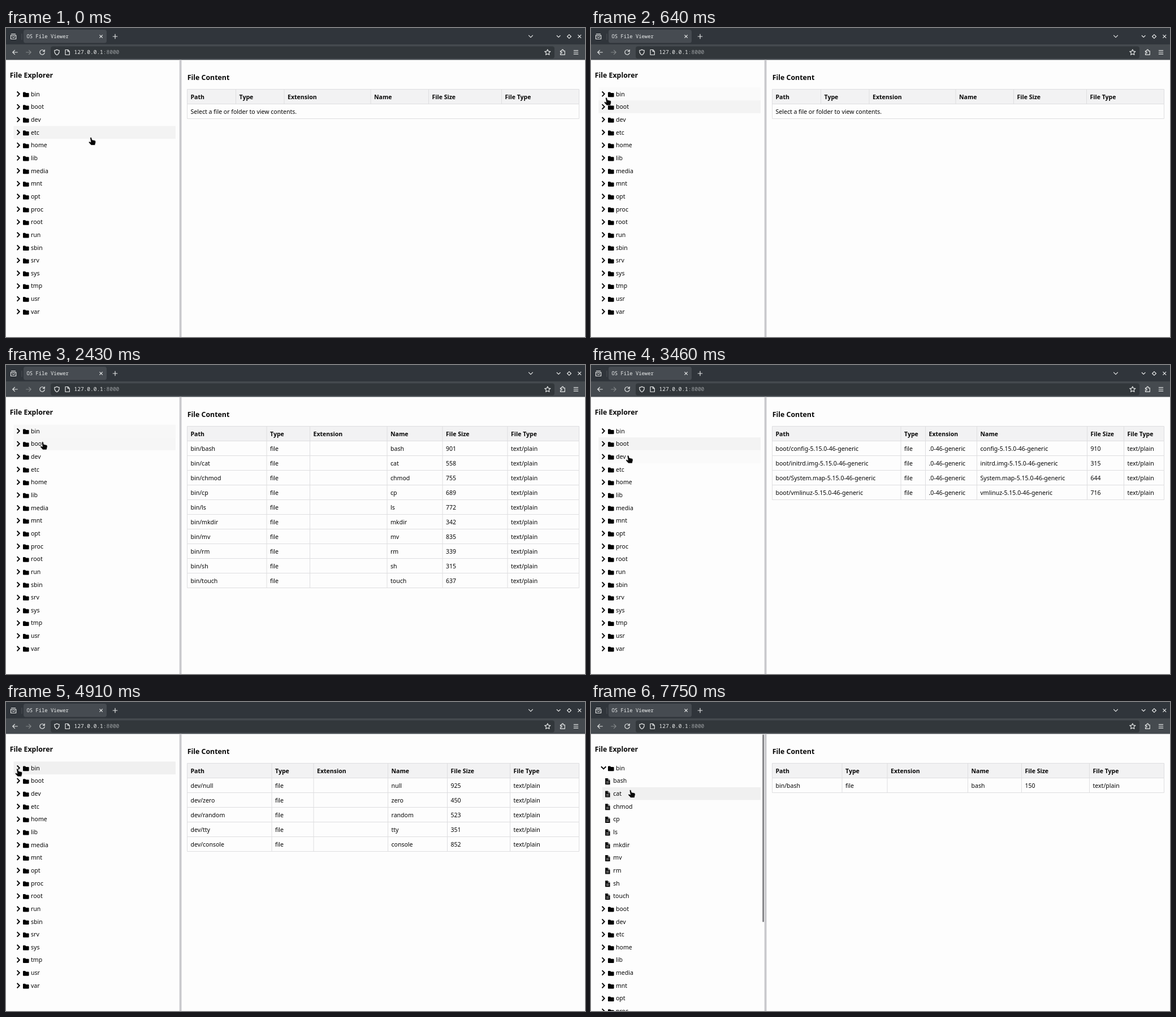
Write an HTML page that moves like this. It is 1024x547 px and loops after 7990 ms.

```html
<!DOCTYPE html>
<html lang="en">
<head>
<meta charset="utf-8">
<title>OS File Viewer</title>
<style>
  html, body { margin: 0; width: 100%; height: 100%; overflow: hidden; background: #fdfdfd; }
  svg { display: block; width: 1024px; height: 547px; }
  text { font: 10.54px "Noto Sans", sans-serif; fill: #060606; white-space: pre; }
  .b { font-weight: 700; }
  .h { font-weight: 700; font-size: 12.33px; }
  .m { font-family: "Noto Sans Mono", monospace; fill: #eceeee; }
  .line { fill: none; stroke: #e4e6e6; stroke-width: 1.2; stroke-linecap: round; stroke-linejoin: round; }
  .chev { fill: none; stroke: #060606; stroke-width: 1.9; }
  .rule { fill: none; stroke: #dedee0; }
</style>
</head>
<body>
<svg viewBox="0 0 1024 547">
  <rect width="1024" height="30" fill="#30353b"/>
  <rect y="29" width="1024" height="27.5" fill="#454a4f"/>
  <rect x="31" y="3" width="147" height="23.5" rx="4" fill="#464b51"/>
  <path d="M28 10V21" stroke="#4c5156"/>
  <rect x="79" y="32.5" width="891" height="21.5" rx="4" fill="#32373b"/>
  <text class="m" x="36.5" y="18.2" style="font-size:8.85px">OS File Viewer</text>
  <text class="m" x="120.5" y="46.3" style="font-size:9.5px">127.0.0.1<tspan fill="#9b9fa2">:8000</tspan></text>
  <g class="line">
    <path d="M9.5 10.5H16.5M8.5 12.8H17.7V19.5H8.5ZM11 15.5Q13 18 15.2 15.5"/>
    <path d="M165.8 12.6l4.6 4.6m0-4.6l-4.6 4.6M189.2 15H196.8M193 11.2V18.8"/>
    <path d="M924.5 13.2l3.5 3.5 3.5-3.5M974.3 13.5l2.9 2.9 2.9-2.9M996 11.6l3.4 3.4-3.4 3.4-3.4-3.4ZM1011.8 12.4l5 5m0-5l-5 5"/>
    <path d="M20.3 43H12M15.5 39.3L11.8 43l3.7 3.7"/>
    <path d="M35.7 43H44M40.5 39.3L44.2 43l-3.7 3.7" stroke="#83878a"/>
    <path d="M67.6 40.7A4.2 4.2 0 1 0 68.2 43.6M68.3 38.6V41.4H65.4"/>
    <path d="M90 38.2Q92 39.6 94.2 39.7Q94.5 45.6 90 47.8Q85.5 45.6 85.8 39.7Q88 39.6 90 38.2Z"/>
    <path d="M105 38.5H109.5L112.3 41.3V47.5H105ZM109.3 38.7V41.5H112"/>
    <path d="M957.8 38l1.5 3.2 3.5.4-2.6 2.4.7 3.5-3.1-1.7-3.1 1.7.7-3.5-2.6-2.4 3.5-.4Z"/>
    <path d="M980.5 40.7H983V39.5a1.4 1.4 0 0 1 2.8 0V40.7H988.3V47.3H980.5V45H982a1.2 1.2 0 0 0 0-2.4H980.5Z"/>
    <path d="M1004.3 39.8H1011.7M1004.3 43H1011.7M1004.3 46.2H1011.7"/>
  </g>
  <rect x="306.7" y="56.5" width="3.8" height="491" fill="#c9c9cd"/>
  <text class="h" x="6.8" y="88.4">File Explorer</text>
  <text class="h" x="320.8" y="91.7">File Content</text>
  <g id="hover"></g>
  <g id="trees"></g>
  <g id="tables"></g>
  <path id="hand" fill="#060606" stroke="#fdfdfd" stroke-width=".7"
    d="M-1.9 1Q-.6 -1 .9 .8L1.9 4.4L6.8 5.5Q8.7 6.3 8.2 9L6.9 14H.2L-4.2 9.2Q-4.6 7.2 -2.5 7.6L-.6 8.6Z"/>
</svg>
<script>
const LOOP = 7990, TOP = 105.5, ROW = 22.66, FADE = 200, OPEN_AT = 6110;
const $ = id => document.getElementById(id);
const dirs = 'bin boot dev etc home lib media mnt opt proc root run sbin srv sys tmp usr var'.split(' ');
const files = 'bash cat chmod cp ls mkdir mv rm sh touch'.split(' ');

const text = (x, y, s, cls = '') => `<text x="${x}" y="${y}" class="${cls}">${s}</text>`;

function dirRow(name, i, open) {
  const y = TOP + i * ROW;
  const arrow = open ? 'M17.9 8.8l4.3 4.2 4.3-4.2' : 'M19.6 7l4.2 4.3-4.2 4.3';
  return `<g transform="translate(0 ${y})"><path class="chev" d="${arrow}"/>
    <path d="M30 9Q30 8 31 8H34L35.3 9.4H39.6Q40.6 9.4 40.6 10.4V15.7Q40.6 16.7 39.6 16.7H31Q30 16.7 30 15.7Z"/>
    ${text(44, 15.1, name)}</g>`;
}

function fileRow(name, i) {
  return `<g transform="translate(0 ${TOP + i * ROW})">
    <path d="M25.2 6.8H30L33.6 10.3V17.8H25.2Z"/>
    <path d="M30.3 6.8V10H33.4M27 12.8H31.8M27 15.2H31.8" fill="none" stroke="#fdfdfd" stroke-width=".8"/>
    ${text(39.3, 15.1, name)}</g>`;
}

const closedTree = dirs.map((d, i) => dirRow(d, i)).join('');
const openTree = dirRow('bin', 0, true) + files.map((f, i) => fileRow(f, i + 1)).join('')
  + dirs.slice(1).map((d, i) => dirRow(d, i + 11)).join('')
  + '<rect x="303.3" y="57.5" width="2.6" height="332" rx="1.3" fill="#77777a"/>';
$('trees').innerHTML = `<g>${closedTree}</g><g>${openTree}</g>`;

// Each view: start time, column separators, folder, "name size" entries, extension
const views = [
  [0, [406.5, 492, 645, 747.5, 876.5]],
  [2010, [461, 537.5, 674, 772, 887], 'bin',
    'bash 901,cat 558,chmod 755,cp 689,ls 772,mkdir 342,mv 835,rm 339,sh 315,touch 637'],
  [3020, [548, 591.5, 682.5, 877.5, 942.5], 'boot',
    'config-5.15.0-46-generic 910,initrd.img-5.15.0-46-generic 315,System.map-5.15.0-46-generic 644,vmlinuz-5.15.0-46-generic 716',
    '.0-46-generic'],
  [4050, [470, 544, 675.5, 780.5, 891.5], 'dev', 'null 925,zero 450,random 523,tty 351,console 852'],
  [7200, [444, 524, 666.5, 761.5, 881.5], 'bin', 'bash 150']
];
const heads = ['Path', 'Type', 'Extension', 'Name', 'File Size', 'File Type'];

function table([, seps, dir, list, ext = '']) {
  const xs = [320.5, ...seps];
  const rows = list ? list.split(',').map(e => {
    const [name, size] = e.split(' ');
    return [`${dir}/${name}`, 'file', ext, name, size, 'text/plain'];
  }) : [['Select a file or folder to view contents.']];
  const end = 134.5 + 26 * rows.length;
  const rules = rows.map((_, i) => `M320.5 ${134.5 + 26 * i}H1013.5`).join('')
    + seps.map(x => `M${x} 108.5V${list ? end : 134.5}`).join('');
  const cells = (row, y, cls) => row.map((s, i) => s && text(xs[i] + 6, y, s, cls)).join('');
  return `<g><rect x="320.5" y="108.5" width="693" height="26" fill="#f2f2f3"/>
    <path class="rule" d="M320.5 108.5H1013.5V${end}H320.5Z${rules}"/>
    ${cells(heads, 125.7, 'b')}${rows.map((r, i) => cells(r, 151.7 + 26 * i)).join('')}</g>`;
}
$('tables').innerHTML = views.map(table).join('');

$('hover').innerHTML = [...dirs, ...files].map((_, i) =>
  `<rect y="${TOP + i * ROW}" height="${ROW}" fill="#f0f0f0"/>`).join('');

// Pointer tip: time, x, y
const path = [
  [-150, 310, 200], [-120, 150.5, 193.5], [30, 150.5, 193.5], [640, 27.5, 123], [810, 24, 119],
  [1000, 24, 119], [1500, 52, 118], [2180, 52, 118], [2430, 65, 136], [2660, 58, 140],
  [3350, 58, 140], [3460, 66, 160], [3720, 58, 162], [4290, 58, 162], [4650, 22, 122],
  [4910, 20.5, 118], [6370, 20.5, 117], [6450, 46.5, 146], [6800, 52, 143], [7380, 52, 143],
  [7600, 70, 155.5], [LOOP, 70, 155.5]
];

function tip(t) {
  if (t <= path[0][0]) return path[0].slice(1);
  const i = path.findIndex(p => p[0] >= t);
  const [t0, x0, y0] = path[i - 1], [t1, x1, y1] = path[i];
  const k = (t - t0) / (t1 - t0);
  return [x0 + (x1 - x0) * k, y0 + (y1 - y0) * k];
}

function hoveredRow(t) {
  const [x, y] = tip(t);
  return x > 13 && x < 300 ? Math.floor((y - TOP) / ROW) : -1;
}

const show = (el, on) => el.setAttribute('visibility', on ? 'visible' : 'hidden');

function draw(t) {
  const open = t >= OPEN_AT;
  [...$('trees').children].forEach((g, i) => show(g, open === !!i));
  const current = views.filter(v => v[0] <= t).length - 1;
  [...$('tables').children].forEach((g, i) => show(g, i === current));

  // A row's tint is the share of the recent past it was pointed at
  const steps = 20, share = {};
  for (let i = 0; i < steps; i++) {
    const row = hoveredRow(t - i * FADE / steps);
    share[row] = (share[row] || 0) + 1 / steps;
  }
  [...$('hover').children].forEach((r, i) => {
    const x = open && i > 0 && i <= files.length ? 20 : 13.5;
    r.setAttribute('x', x);
    r.setAttribute('width', 300 - x);
    r.setAttribute('opacity', share[i] || 0);
  });
  $('hand').setAttribute('transform', `translate(${tip(t)})`);
}

const start = performance.now();
function frame() {
  draw((performance.now() - start) % LOOP);
  requestAnimationFrame(frame);
}
frame();
</script>
</body>
</html>
```
